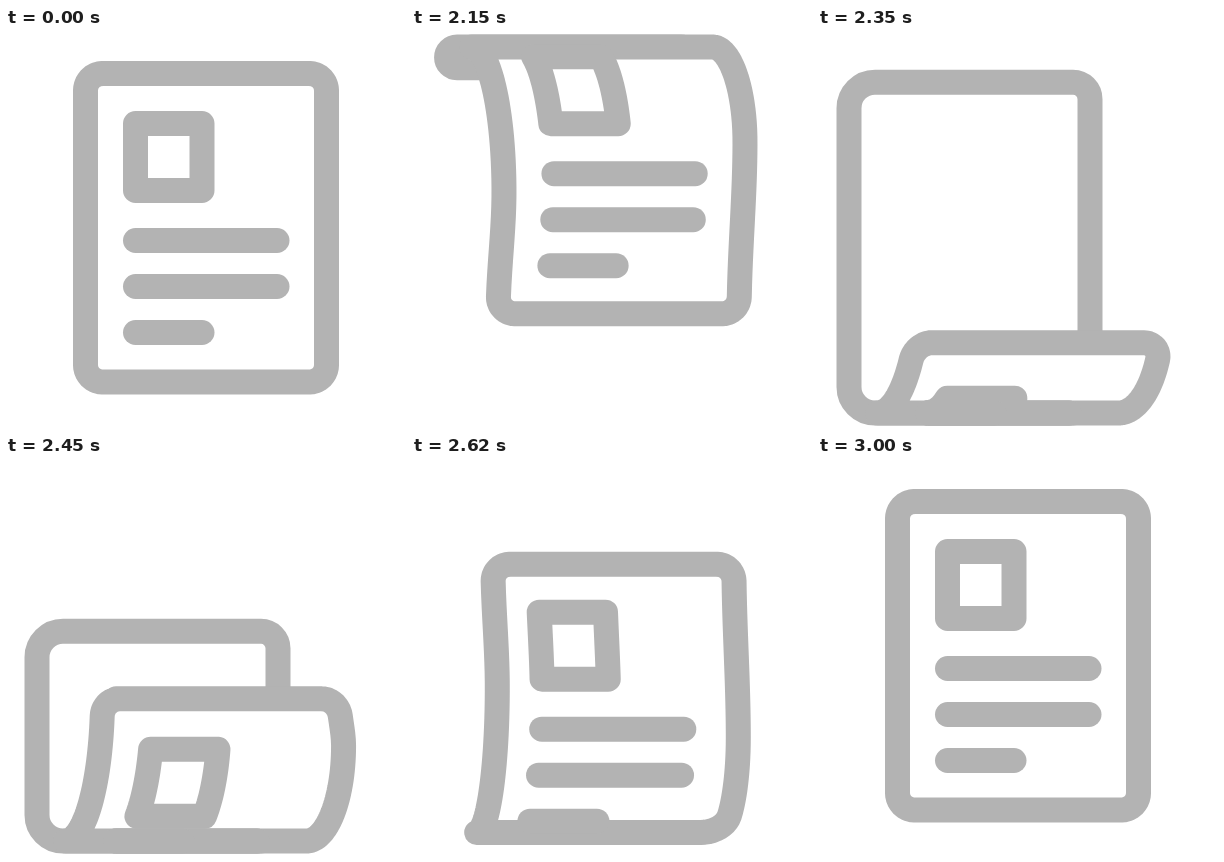
An HTML page with a canvas that plays this animation: 400x400 px, repeating every 3.02 s.

```html
<!DOCTYPE html>
<html lang="en">
<head>
<meta charset="utf-8">
<title>Turning page</title>
<style>
  html, body { margin: 0; width: 100%; height: 100%; overflow: hidden; background: #fff; }
  canvas { display: block; width: 400px; height: 400px; }
</style>
</head>
<body>
<canvas id="stage" width="400" height="400"></canvas>
<script>
const LOOP = 3020, REST = 2020, SWAP = 290;
const LEFT = 79.5, RIGHT = 320.5, TOP = 45.5, HEIGHT = 308.5, BOTTOM = TOP + HEIGHT;
const UPPER = 19, LOWER = 385, RADIUS = 17;
const ctx = document.getElementById("stage").getContext("2d");

const clamp = (v, lo, hi) => Math.min(hi, Math.max(lo, v));
const lerp = (a, b, u) => a + (b - a) * u;
const phase = (t, start, end) => clamp((t - start) / (end - start), 0, 1);
const smooth = u => u * u * (3 - 2 * u);
const quarter = u => Math.sqrt(1 - (1 - clamp(u, 0, 1)) ** 2);

// The sheet steps 40 times a second, held for 30 and 20 ms in turn.
function snap(t) {
  const m = t % 50;
  return t < 0 ? 0 : t - m + (m < 30 ? 0 : 25);
}

// Where the folds and edges of the sheet are, t ms after it starts to move.
function pose(t) {
  const v = phase(t, 668, 975);
  const bounce = 33 * Math.sin(Math.PI * v) * (1 - v) ** 2;
  const oldBottom = lerp(BOTTOM, UPPER, phase(t, 0, 277) ** 2);
  const upper = Math.max(UPPER, oldBottom - HEIGHT);
  const lower = lerp(LOWER, BOTTOM, phase(t, 525, 668) ** 2) - bounce;
  const bulge = smooth(phase(t, 0, 240)) * (1 - phase(t, 325, 690));
  const curl = smooth(phase(t, 0, 130)) - smooth(phase(t, 540, 720));
  const backTop = upper + (LOWER - UPPER) * phase(t, 296, 598);
  const backBottom = t < 275 ? upper + (LOWER - UPPER) * phase(t, 78, 275) ** 2 : lower;
  return {
    backTop,
    backLength: Math.max(0, backBottom - backTop),
    oldBottom, upper, lower,
    newTop: lerp(LOWER, TOP, 1 - (1 - phase(t, 224, 668)) ** 0.9) - bounce,
    foldShift: -20 * curl,
    bulge: 23.5 * bulge,
    endShift: 23.5 * bulge ** 2,
    contentShift: -5 * Math.sin(Math.PI * phase(t, 500, 700))
  };
}

function trace(points, closed) {
  ctx.beginPath();
  points.forEach(p => ctx.lineTo(...p));
  if (closed) ctx.closePath();
}

// Half an outline, running from the free edge to the fold.
function side(x, dir, free, fold, freeR, foldR) {
  const down = Math.sign(fold - free) || 1, pts = [], n = 10;
  const start = free + down * freeR, end = fold - down * foldR;
  for (let k = 0; k <= n; k++) {
    const a = k / n * Math.PI / 2;
    pts.push([x + dir * freeR * (1 - Math.sin(a)), start - down * freeR * Math.cos(a)]);
  }
  for (let k = 1; k <= 40; k++) pts.push([x, lerp(end, start, (1 - k / 40) ** 2)]);
  for (let k = 1; k <= n && foldR > 0; k++) {
    const a = k / n * Math.PI / 2;
    pts.push([x + dir * foldR * (1 - Math.cos(a)), end + down * foldR * Math.sin(a)]);
  }
  return pts;
}

function drawBack(s) {
  const x = LEFT + s.foldShift - 28.5 * quarter(s.backLength / 40);
  ctx.beginPath();
  ctx.roundRect(x, s.backTop, RIGHT - LEFT, s.backLength, [26, RADIUS, RADIUS, 26]);
  ctx.stroke();
}

function drawFront(s, free, fold, offset) {
  const length = Math.abs(fold - free);

  // Leans a point sideways along the bend; the left edge bends more gently.
  const lean = (x, y) => {
    const bend = lerp(145, 95, (x - LEFT) / (RIGHT - LEFT));
    const w = Math.abs(y - fold);
    const shift = w < bend
      ? lerp(s.foldShift, s.bulge, quarter(w / bend))
      : lerp(s.bulge, s.endShift, smooth(phase(w, bend, Math.max(length, bend + 1))));
    return [x + shift, y];
  };
  const r = Math.min(RADIUS, length / 2);
  const leftR = r * clamp(1 + s.foldShift / 14, 0, 1);
  const rightR = r * clamp(1 - s.backLength / 20, 0, 1);
  const outline = side(LEFT, 1, free, fold, r, leftR)
    .concat(side(RIGHT, -1, free, fold, r, rightR).reverse());
  trace(outline.map(p => lean(...p)), true);
  ctx.fill();
  ctx.stroke();

  // Printed parts stop at the fold.
  const limit = fold > free ? Math.min : Math.max;
  const place = (x, y) => {
    const [px, py] = lean(x, limit(y + offset, fold));
    return [px + s.contentShift, py];
  };
  const column = x => Array.from({ length: 17 }, (_, k) => place(x, 95.5 + 67 * k / 16));
  trace(column(129.5).concat(column(196).reverse()), true);
  ctx.stroke();
  for (let row = 0; row < 3; row++) {
    const y = 212.5 + 46 * row;
    trace([place(129.5, y), place(row < 2 ? 271 : 196, y)], false);
    ctx.stroke();
  }
}

function draw(t) {
  const s = pose(t);
  ctx.fillStyle = "#fff";
  ctx.fillRect(0, 0, 400, 400);
  ctx.strokeStyle = "#b3b3b3";
  ctx.lineWidth = 25;
  ctx.lineCap = ctx.lineJoin = "round";

  const settled = t < 78 || t > 598;
  if (settled) s.backLength = 0;
  else drawBack(s);

  if (t < SWAP) {
    drawFront(s, s.oldBottom, s.upper, (s.oldBottom - BOTTOM) * 0.98);
  } else {
    const d = s.newTop - TOP;
    drawFront(s, s.newTop, s.lower, d * (0.95 + d / 3800));
  }
}

const begin = performance.now();
function tick() {
  draw(snap((performance.now() - begin) % LOOP - REST));
  requestAnimationFrame(tick);
}
tick();
</script>
</body>
</html>
```
